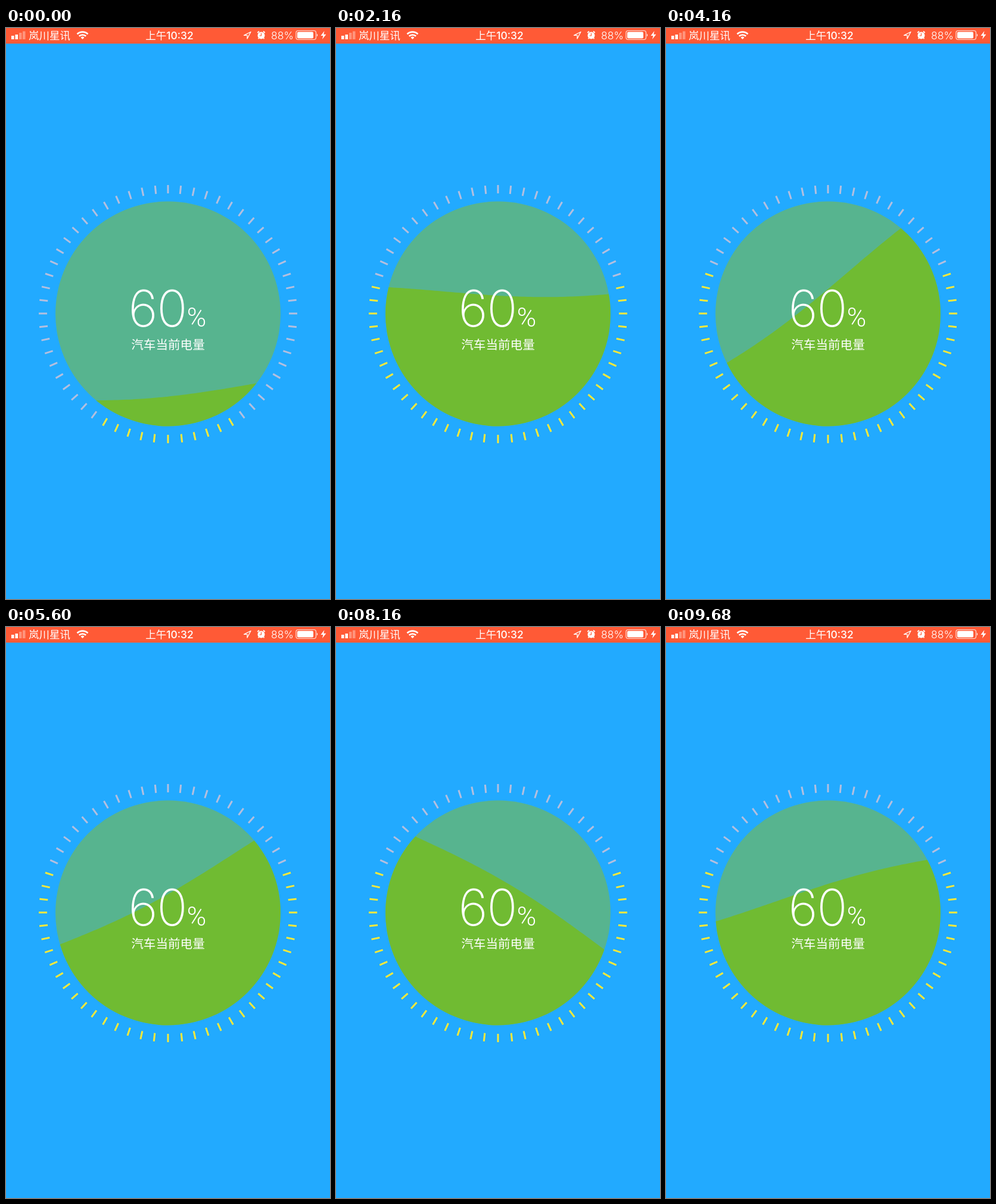
Recreate the animation shown at these times as an HTML page. Size 544 by 960 pixels, loop 9.76 s.

```html
<!DOCTYPE html>
<html lang="zh-CN">
<head>
<meta charset="utf-8">
<title>汽车当前电量</title>
<style>
  html, body { margin: 0; width: 100%; height: 100%; overflow: hidden; background: #22aaff; }
  svg { display: block; width: 544px; height: 960px; }
  text { fill: #fff; font-family: Inter, "Noto Sans CJK SC", "Noto Sans CJK", sans-serif; }
  .status { font-size: 17.5px; }
  .number { font-size: 85px; font-weight: 200; font-optical-sizing: none; }
  .percent { font: 300 44px Roboto, sans-serif; }
  .middle { text-anchor: middle; }
  .line { fill: none; stroke: #fff; }
</style>
</head>
<body>
<svg viewBox="0 0 544 960">
  <defs><clipPath id="bowl"><circle r="189"/></clipPath></defs>
  <rect width="544" height="960" fill="#22aaff"/>

  <g id="statusBar" fill="#fff">
    <rect width="544" height="26.3" fill="#ff5a36"/>
    <rect x="9" y="13" width="4.5" height="6"/>
    <rect x="15.5" y="11" width="4.5" height="8"/>
    <rect x="22" y="8" width="4.5" height="11" opacity=".35"/>
    <rect x="28" y="5.5" width="4.5" height="13.5" opacity=".35"/>
    <text class="status" x="38" y="18.5" font-weight="300">岚川星讯</text>
    <g class="line" stroke-width="2.7">
      <path d="M119.5 10.3A13 13 0 0 1 137.5 10.3"/>
      <path d="M122.8 13.8A8.2 8.2 0 0 1 134.2 13.8"/>
    </g>
    <path d="M128.500 19L125.600 16A4.200 4.200 0 0 1 131.400 16Z"/>
    <text class="status middle" x="274.500" y="18.500" font-weight="500">上午10:32</text>
    <path class="line" stroke-width="1.300" stroke-linejoin="round" d="M411 6.500L399.500 12.300H405V18Z"/>
    <circle cx="428.500" cy="12.500" r="6"/>
    <path class="line" stroke-width="1.800" d="M422.300 8L425 5.500M432 5.500L434.700 8M424.500 17L423.500 18.300M432.500 17L433.500 18.300"/>
    <path class="line" style="stroke:#ff5a36" stroke-width="1.200" d="M428.500 8.500V13H425.500"/>
    <text class="status" x="445" y="18.500" font-weight="300">88%</text>
    <rect class="line" x="487" y="4.500" width="33.500" height="15" rx="3.500" stroke-width="1.200" opacity=".8"/>
    <rect x="489" y="6.500" width="27" height="11" rx="2"/>
    <path d="M522 9.500Q524.500 12 522 14.500Z"/>
    <path d="M534.500 5L528.500 13H532.500L531 19L537.500 10.800H533.300Z"/>
  </g>

  <g id="ticks" transform="translate(272 481)" stroke-width="3"></g>

  <g transform="translate(272 480.500)">
    <circle r="189" fill="#57b48f"/>
    <g clip-path="url(#bowl)"><path id="water" fill="#70bb32"/></g>
  </g>

  <text class="number middle" x="230 279" y="502">60</text>
  <text class="percent middle" x="320" y="502">%</text>
  <text class="middle" x="272" y="539.500" font-size="20.600" font-weight="300">汽车当前电量</text>
</svg>

<script>
const LOOP = 9760, STEP = 80;
const RADIUS = 189, AMPLITUDE = 12, WAVE_NUMBER = Math.PI / 370;

// Seconds, tilt in degrees, wave phase in radians
const keys = [
  [0, -4, 2], [2.16, -0.9, 19.6], [4.16, -34.7, 33.97], [5.6, -27, 45.88],
  [6.8, 23.1, 54.67], [8.16, 30.6, 67.63], [9.68, -13.3, 79.22]
];

const water = document.getElementById('water');
const tickGroup = document.getElementById('ticks');
const ticks = Array.from({ length: 60 }, (_, i) => {
  const tick = document.createElementNS('http://www.w3.org/2000/svg', 'path');
  const lean = i % 30 ? (i < 30 ? -0.27 : 0.27) : 0;
  tick.setAttribute('d', 'M0 -217V-203');
  tick.setAttribute('transform', `rotate(${i * 6 + lean})`);
  return tickGroup.appendChild(tick);
});

function slope(i, column) {
  const a = keys[Math.max(i - 1, 0)], b = keys[Math.min(i + 1, keys.length - 1)];
  return (b[column] - a[column]) / (b[0] - a[0]);
}

// Smooth curve through one column of the keys
function sample(t, column) {
  let i = 0;
  while (i < keys.length - 2 && t >= keys[i + 1][0]) i++;
  const a = keys[i], b = keys[i + 1], span = b[0] - a[0];
  const u = (t - a[0]) / span, v = 1 - u;
  return a[column] * v * v * (1 + 2 * u) + b[column] * u * u * (3 - 2 * u)
    + span * u * v * (slope(i, column) * v - slope(i + 1, column) * u);
}

function draw(t) {
  const level = Math.min(38.8, -127.5 + 77 * t);
  const phase = sample(t, 2);
  const bottom = RADIUS + 11;
  let d = `M-200 ${bottom}`;
  for (let x = -200; x <= 200; x += 5) {
    d += `L${x} ${(AMPLITUDE * Math.sin(WAVE_NUMBER * x + phase) - level).toFixed(2)}`;
  }
  water.setAttribute('d', d + `L200 ${bottom}Z`);
  water.setAttribute('transform', `rotate(${sample(t, 1).toFixed(2)})`);

  const lit = Math.min(18, Math.floor(5.2 + 5.7 * t));
  ticks.forEach((tick, i) =>
    tick.setAttribute('stroke', Math.abs(i - 30) <= lit ? '#f6e93a' : '#b4bfdf'));
}

function frame() {
  const now = performance.now() % LOOP;
  draw(Math.floor(now / STEP) * STEP / 1000);
  requestAnimationFrame(frame);
}
frame();
</script>
</body>
</html>
```
